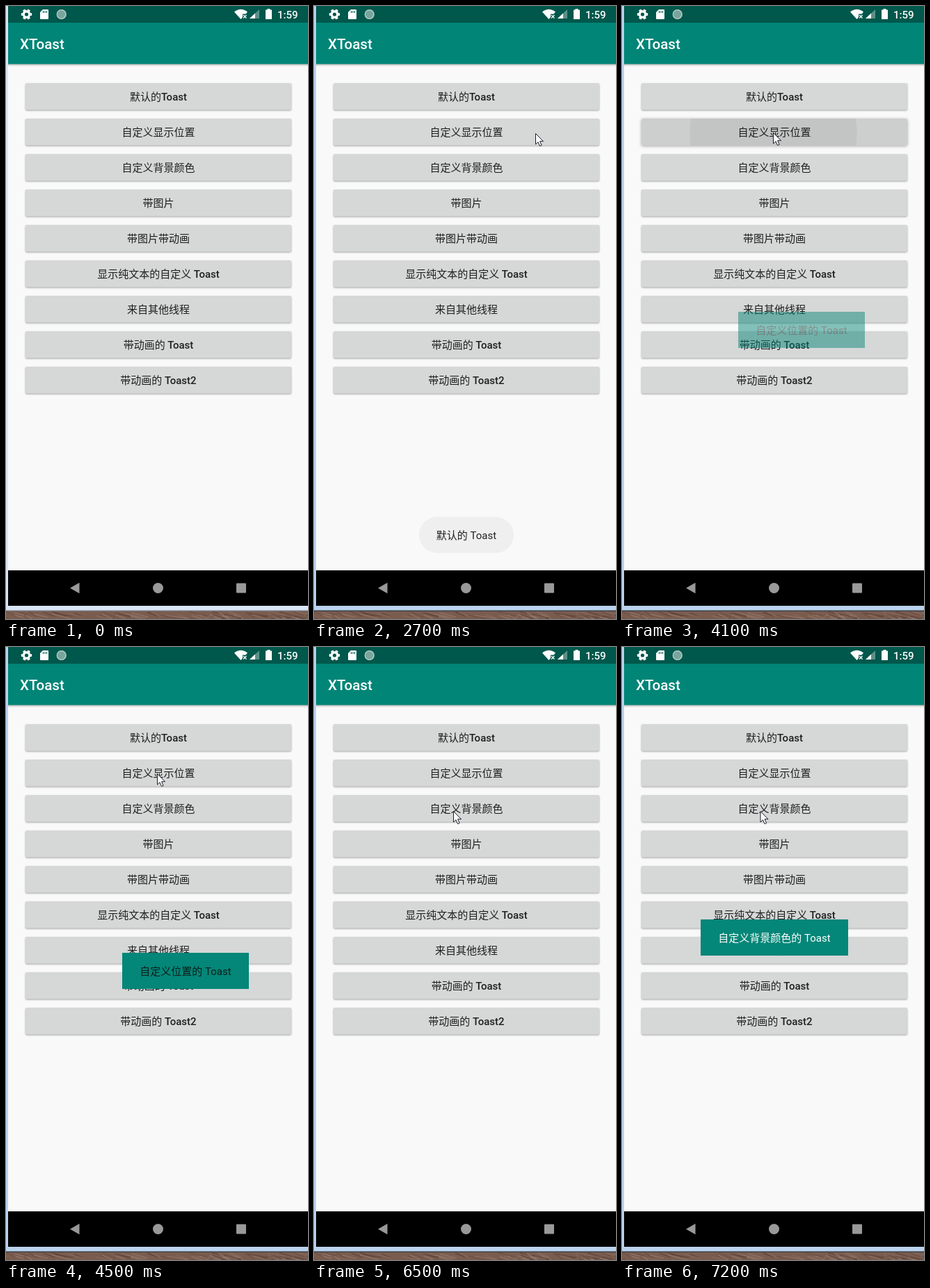
Recreate the animation shown at these times as an HTML page. Size 434 by 882 pixels, loop 8000 ms.

```html
<!DOCTYPE html>
<html lang="zh-CN">
<head>
<meta charset="utf-8">
<style>
  html, body { margin: 0; width: 100%; height: 100%; overflow: hidden; }
  svg { display: block; width: 434px; height: 882px; }
  text { font: 400 15px Roboto, "Noto Sans CJK SC", "Noto Sans CJK", sans-serif; white-space: pre; }
  .mid { text-anchor: middle; }
  .med { font-weight: 500; }
</style>
</head>
<body>
<svg viewBox="0 0 434 882">
  <defs>
    <linearGradient id="shade" x2="0" y2="1">
      <stop stop-color="#000" stop-opacity=".3"/>
      <stop offset="1" stop-color="#000" stop-opacity="0"/>
    </linearGradient>
  </defs>

  <!-- desktop and window frame -->
  <rect width="434" height="882" fill="#7a5c4f"/>
  <g id="wood" stroke-width="1.2"></g>
  <rect id="frame" width="434" height="870"/>
  <rect id="edge" y="869.5" width="434" height="1.5"/>

  <!-- app -->
  <rect x="3" width="431" height="863" fill="#f9f9f9"/>
  <rect x="3" y="83" width="431" height="4" fill="url(#shade)"/>
  <rect x="3" y="24" width="431" height="59.5" fill="#008577"/>
  <rect x="3" width="431" height="24" fill="#00574b"/>
  <text class="med" x="20" y="62" fill="#fff" style="font-size:20.6px">XToast</text>

  <!-- status bar -->
  <g fill="none" stroke="#fff">
    <circle cx="29.5" cy="12" r="4.3" stroke-width="3.4"/>
    <circle cx="29.5" cy="12" r="6.5" stroke-width="2.4" pathLength="12" stroke-dasharray="1.1 .9" stroke-dashoffset=".55"/>
  </g>
  <path d="M53 5h7q1 0 1 1v12q0 1-1 1h-10q-1 0-1-1v-9z" fill="#fff"/>
  <path d="M53.5 7v3M56 7v3M58.5 7v3" stroke="#00574b" stroke-width="1.1"/>
  <circle cx="80" cy="12" r="7" fill="#78a59d"/>
  <circle cx="79.5" cy="12" r="6.3" fill="none" stroke="#b5cdc8" stroke-width="1.2"/>
  <path d="M328 8.5q9.500-7.500 19 0l-2.500 3h-4.500v4.500l-2.500 3z" fill="#fff"/>
  <path d="M341 13l4.500 4.500M345.500 13l-4.500 4.500" stroke="#fff" stroke-width="1.4"/>
  <path d="M364 5v13h-14z" fill="#5d9087"/>
  <path d="M358 10.600v7.400h-8z" fill="#fff"/>
  <path d="M375.500 4h4v1.500h2.500v13.500h-9v-13.500h2.500z" fill="#fff"/>
  <text class="med" x="390" y="17.500" fill="#fff">1:59</text>

  <g id="buttons"></g>

  <!-- navigation bar -->
  <rect x="3" y="812" width="431" height="51" fill="#000"/>
  <g fill="#999">
    <path d="M92 837.500l13.500-7.700v15.400z"/>
    <circle cx="218.500" cy="837.500" r="7.500"/>
    <rect x="331" y="830.500" width="14" height="14" rx="1"/>
  </g>

  <g id="toasts"></g>
  <path id="cursor" d="M.5.5v15.500l3.500-3.300 2.500 5.800 2.600-1.100-2.500-5.700h4.900z"
        fill="#fff" stroke="#1c1c2c" stroke-linejoin="round"/>
</svg>

<script>
const $ = id => document.getElementById(id);
const clamp = v => Math.max(0, Math.min(1, v));

const labels = ['默认的Toast', '自定义显示位置', '自定义背景颜色', '带图片', '带图片带动画',
  '显示纯文本的自定义 Toast', '来自其他线程', '带动画的 Toast', '带动画的 Toast2'];

// start/end: when the toast begins to fade in and out; px, py: ripple centre
const toasts = [
  { text: '默认的 Toast', x: 151, y: 735, w: 136, r: 26, bg: '#efefef', fg: '#222', start: 1500, end: 3500, px: 238, py: 129 },
  { text: '自定义位置的 Toast', x: 167, y: 440, w: 182, r: 0, bg: '#048678', fg: '#0c1f1c', start: 3960, end: 5740, px: 217.5, py: 182 },
  { text: '自定义背景颜色的 Toast', x: 113, y: 392, w: 212, r: 0, bg: '#048678', fg: '#fff', start: 6700, end: 9000, px: 203, py: 236 }
];

// cursor stops: time, x, y
const path = [[600, 440, 600], [1300, 242, 126], [2100, 242, 126], [2700, 318, 183], [2800, 318, 183],
  [3100, 235, 181], [3300, 235, 181], [3600, 217, 182], [5700, 217, 182], [6300, 200, 236],
  [6500, 200, 236], [6600, 198.5, 236], [8000, 198.5, 236]];

$('buttons').innerHTML = labels.map((label, i) => {
  const y = 111 + 51 * i;
  const box = `x="28" y="${y}" width="382" height="38.5" rx="2"`;
  return `<clipPath id="clip${i}"><rect ${box}/></clipPath>
    <g id="button${i}">
      <rect ${box} fill="#d6d7d7"/>
      <g clip-path="url(#clip${i})"><rect ${box} id="press${i}" opacity="0"/><circle id="ripple${i}" opacity="0"/></g>
    </g>
    <text class="mid" x="219" y="${y + 25}" fill="#1f1f1f">${label.replace(/Toast2?/, '<tspan class="med">$&</tspan>')}</text>`;
}).join('');

$('toasts').innerHTML = toasts.map((o, i) => `<g id="toast${i}">
    <rect x="${o.x}" y="${o.y}" width="${o.w}" height="52" rx="${o.r}" fill="${o.bg}"/>
    <text class="mid" x="${o.x + o.w / 2}" y="${o.y + 32}" fill="${o.fg}">${o.text}</text>
  </g>`).join('');

// slanted wood grain
let seed = 7;
const rand = () => (seed = seed * 16807 % 2147483647) / 2147483647;
const tones = ['#5f443a', '#93776a', '#6b4e42', '#876a5d'];
for (let i = 0; i < 110; i++) {
  const x = rand() * 460 - 25, y = 871 + rand() * 12;
  $('wood').innerHTML += `<path d="M${x} ${y}l${12 + rand() * 18} ${4 + rand() * 4}" stroke="${tones[i % 4]}"/>`;
}

function cursorAt(t) {
  const i = Math.max(1, path.findIndex(p => p[0] > t));
  const [t0, x0, y0] = path[i - 1], [t1, x1, y1] = path[i];
  const p = clamp((t - t0) / (t1 - t0)), e = p * p * (3 - 2 * p);
  return [x0 + (x1 - x0) * e, y0 + (y1 - y0) * e];
}

function draw(t) {
  const active = t >= 1200;
  $('frame').setAttribute('fill', active ? '#bad3ee' : '#d9e6f5');
  $('edge').setAttribute('fill', active ? '#3c3f45' : '#76797e');

  labels.forEach((_, i) => {
    const o = toasts[i];
    let press = 0;
    if (o) {
      const dt = t - o.start;
      press = clamp((dt + 100) / 100) * clamp((240 - dt) / 100);
      const ripple = $('ripple' + i);
      ripple.setAttribute('cx', o.px);
      ripple.setAttribute('cy', o.py);
      ripple.setAttribute('r', Math.max(0, .6 * (dt + 60)));
      ripple.setAttribute('opacity', press * .05);
      $('press' + i).setAttribute('opacity', press * .045);
      $('toast' + i).setAttribute('opacity',
        (1 - (1 - clamp(dt / 500)) ** 2) * (1 - clamp((t - o.end) / 500) ** 2));
    }
    $('button' + i).style.filter = `drop-shadow(0 1px ${1 + press}px rgba(0,0,0,.35))`;
  });

  $('cursor').setAttribute('transform', `translate(${cursorAt(t)})`);
}

function tick(now) {
  // the screen refreshes ten times a second
  draw(Math.floor(now % 8000 / 100) * 100);
  requestAnimationFrame(tick);
}
draw(0);
requestAnimationFrame(tick);
</script>
</body>
</html>
```
